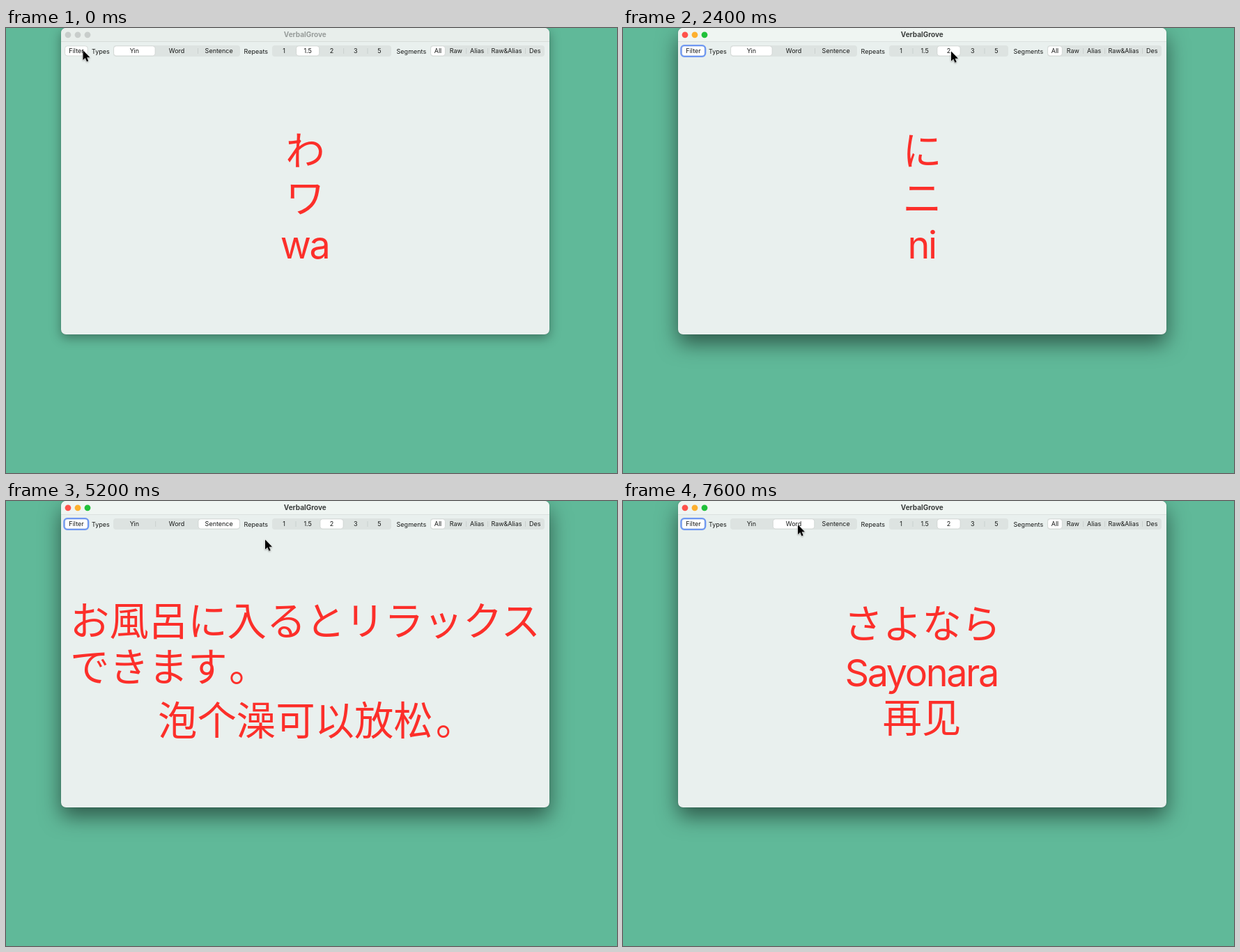
These frames come from a looping animation (877 by 639 pixels, 8000 ms). An HTML page:

```html
<!DOCTYPE html>
<html lang="ja">
<head>
<meta charset="utf-8">
<title>Kana practice</title>
<style>
  html, body { margin: 0; width: 100%; height: 100%; overflow: hidden; background: #60b999; }
  #window {
    position: absolute; left: 79px; top: 0; width: 701px; height: 440px;
    border-radius: 7px; background: #e9f0ee; overflow: hidden;
    box-shadow: 0 5px 16px rgba(0,0,0,.36), 0 0 1px rgba(0,0,0,.4);
  }
  #window.active { box-shadow: 0 13px 30px rgba(0,0,0,.52), 0 0 1px rgba(0,0,0,.5); }
  #bar { height: 19px; background: #e8eeeb; border-bottom: 1px solid #d6dcd9; }
  .active #bar { background: #eff5f2; border-color: #dce2df; }
  svg { position: absolute; left: 0; top: 0; }
  text { font: 9px Inter, sans-serif; font-optical-sizing: none; fill: #181a19; }
  .mid { text-anchor: middle; }
  #title { font-size: 10px; font-weight: 700; }
  #words text { fill: #fc2f2a; font-size: 56.4px; }
  #words .ja { font-family: "Noto Sans CJK JP", "Noto Sans CJK", sans-serif; }
  #words .zh { font-family: "Noto Sans CJK SC", "Noto Sans CJK", sans-serif; }
  #words .latin { font-size: 54px; letter-spacing: -.045em; }
</style>
</head>
<body>
<div id="window"><div id="bar"></div></div>
<svg id="stage" width="877" height="639" viewBox="0 0 877 639">
  <g id="controls"></g>
  <g id="words"></g>
  <path id="cursor" d="M0 0V14L3.2 11 5.5 16.2 7.7 15.2 5.6 10.2H10Z" stroke="#fff" stroke-width=".9"
    paint-order="stroke" style="filter:drop-shadow(0 1px 1px rgba(0,0,0,.35))"/>
</svg>
<script>
const LOOP = 8000, STEP = 200;
const $ = id => document.getElementById(id);

const label = (str, x, y, attrs = 'class="mid"') =>
  `<text x="${x}" y="${y}" ${attrs}>${str.replace('&', '&amp;')}</text>`;
const box = (x, y, w, h, r, attrs) =>
  `<rect x="${x}" y="${y}" width="${w}" height="${h}" rx="${r}" ${attrs}/>`;
const pill = (x, w) =>
  box(x, 25.8, w, 14.2, 3.6, 'fill="#fff" stroke="#c7cdca" stroke-width=".7"');

// Segmented control: edges has one more entry than names.
function segments(names, edges, selected) {
  const last = edges[names.length];
  let out = box(edges[0], 25, last - edges[0], 16, 4, 'fill="#dde3e1"');
  for (let i = 1; i < names.length; i++)
    if (i !== selected && i !== selected + 1)
      out += box(edges[i] - .4, 29, .8, 8, 0, 'fill="#c6ccca"');
  out += pill(edges[selected] + .6, edges[selected + 1] - edges[selected] - 1.2);
  return out + names.map((n, i) => label(n, (edges[i] + edges[i + 1]) / 2, 36)).join('');
}

function controls(active, type, repeat) {
  const lights = active ? ['#ff524b', '#fdb02f', '#20c13a'] : Array(3).fill('#c8cdcb');
  const ring = active ? box(83.4, 25.2, 34.8, 15.6, 4.5, 'fill="none" stroke="#6f98f2" stroke-width="2.3"') : '';
  return lights.map((c, i) => `<circle cx="${89 + 14 * i}" cy="9.8" r="4.4" fill="${c}"/>`).join('')
    + label('VerbalGrove', 429.3, 13.2, `id="title" class="mid" style="fill:${active ? '#3b3e3d' : '#979c9a'}"`)
    + pill(84.6, 32.6) + ring + label('Filter', 101, 36)
    + label('Types', 123, 36.5, '') + label('Repeats', 341.6, 36.5, '') + label('Segments', 560.6, 36.5, '')
    + segments(['Yin', 'Word', 'Sentence'], [154, 214.7, 275.4, 336], type)
    + segments(['1', '1.5', '2', '3', '5'], [382, 416, 450.3, 484.7, 519, 553], repeat)
    + segments(['All', 'Raw', 'Alias', 'Raw&Alias', 'Des'], [609, 631, 660.7, 691.7, 745.5, 773], 0);
}

// Sets the full stop a little to the right within its cell.
const withStop = (str, dx) => `${str}<tspan dx="${dx}">。</tspan>`;

const kana = (hira, kata, latin) =>
  label(hira, 429.5, 196.7, 'class="mid ja"') + label(kata, 429.5, 264.7, 'class="mid ja"')
  + label(latin, 428.5, 330.5, 'class="mid latin"');
const sentence = (first, second, chinese) =>
  label(first, 92, 193, 'class="ja"') + label(withStop(second, 8), 92, 259, 'class="ja"')
  + label(withStop(chinese, 4), 218, 336, 'class="zh" lang="zh-CN"');
const word = (hira, latin, chinese) =>
  label(hira, 429.5, 196.7, 'class="mid ja"') + label(latin, 428.2, 265.5, 'class="mid latin"')
  + label(chinese, 429, 331.5, 'class="mid zh" lang="zh-CN"');

const cards = [
  [0, kana('わ', 'ワ', 'wa')],
  [800, kana('え', 'エ', 'e')],
  [2200, kana('に', 'ニ', 'ni')],
  [3600, kana('ろ', 'ロ', 'ro')],
  [4400, sentence('お風呂に入るとリラックス', 'できます', '泡个澡可以放松')],
  [6400, sentence('新しい言葉を学ぶのは楽し', 'いです', '学新词汇很有趣')],
  [7600, word('さよなら', 'Sayonara', '再见')],
];
const typeChanges = [[0, 0], [4400, 2], [7400, 1]];
const repeatChanges = [[0, 1], [2200, 2]];
const activeChanges = [[0, false], [2000, true]];

// [time, x, y] of the pointer tip
const path = [
  [0, 110.5, 32], [200, 110.5, 32], [1200, 494, 36], [1600, 498.5, 35.5], [2200, 471, 33.5],
  [2800, 471, 33.5], [3600, 399.5, 33.5], [3800, 399.5, 33.5], [4300, 306, 33.5], [4800, 306, 34],
  [5200, 372, 55.5], [5500, 700, 330], [5700, 600, 400], [6200, 251, 34], [8000, 251, 34],
];

const valueAt = (changes, t) => changes.filter(c => c[0] <= t).pop()[1];

function pointerAt(t) {
  const i = path.findIndex(p => p[0] > t);
  const [t0, x0, y0] = path[i - 1], [t1, x1, y1] = path[i];
  const u = (t - t0) / (t1 - t0), k = u * u * (3 - 2 * u);
  return [x0 + (x1 - x0) * k, y0 + (y1 - y0) * k];
}

let shown = -1;
function draw(now) {
  const t = Math.floor(now % LOOP / STEP) * STEP;
  if (t !== shown) {
    shown = t;
    const active = valueAt(activeChanges, t);
    $('window').classList.toggle('active', active);
    $('controls').innerHTML = controls(active, valueAt(typeChanges, t), valueAt(repeatChanges, t));
    $('words').innerHTML = valueAt(cards, t);
    $('cursor').setAttribute('transform', `translate(${pointerAt(t)})`);
  }
}

const start = performance.now();
function tick() {
  draw(performance.now() - start);
  requestAnimationFrame(tick);
}
tick();
</script>
</body>
</html>
```
